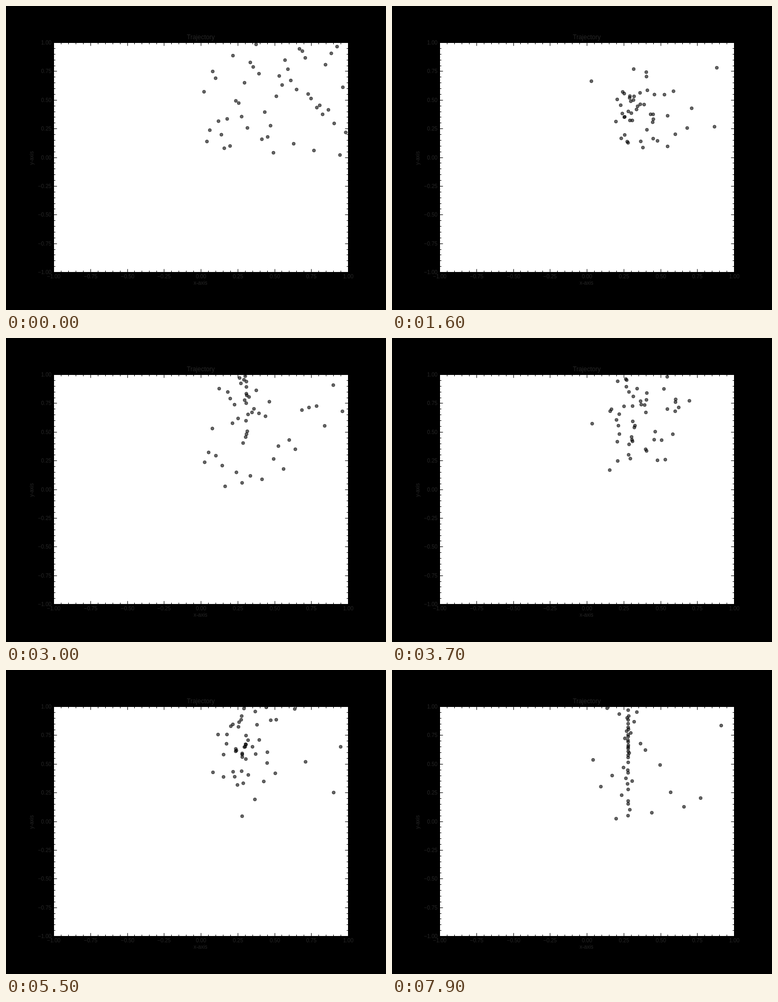
An HTML page with a canvas that plays this animation: 720x576 px, repeating every 8000 ms.

```html
<!DOCTYPE html>
<html lang="en">
<head>
<meta charset="utf-8">
<title>Trajectory</title>
<style>
html, body { margin: 0; width: 100%; height: 100%; overflow: hidden; background: #000; }
canvas { display: block; }
</style>
</head>
<body>
<canvas id="stage" width="720" height="576"></canvas>
<script>
const ctx = document.getElementById('stage').getContext('2d');
const LOOP = 8000, STEP = 100, COUNT = 50;
const L = 90, R = 648, T = 69.12, B = 504;
const FONT = '"Liberation Sans", Arial, sans-serif';

// The walls that hold the swarm
const WALL = { left: 372, right: 646, top: 70, bottom: 284 };

// Swarm centre at a step; px and py set how tightly dots crowd around it (1 = evenly spread)
const swarms = [
  { at: 0, x: 509, y: 177, px: 1, py: 1 },
  { at: 9, x: 436, y: 178, px: 2.3, py: 1.8 },
  { at: 23, x: 472, y: 213, px: 3.2, py: 2.8 },
  { at: 30, x: 455, y: 143, px: 2.4, py: 1.2 },
  { at: 45, x: 448, y: 137, px: 4, py: 3.2 },
  { at: 65, x: 446, y: 155, px: 4.5, py: 1.1 },
  { at: 79, x: 447, y: 155, px: 6, py: 1.1 }
];

const frac = v => v - Math.floor(v);
const noise = (a, b) => frac(Math.sin(a * 127.1 + b * 311.7) * 43758.5453);

// Shuffled, evenly spaced values from -1 to 1
function shuffled(seed) {
  return Array.from({ length: COUNT }, (_, i) => i)
    .sort((a, b) => noise(a + 1, seed) - noise(b + 1, seed))
    .map(i => (2 * i + 1) / COUNT - 1);
}

// Signed u becomes a place between the centre and one wall
const spread = (u, mid, lo, hi, power) =>
  mid + (u < 0 ? lo - mid : hi - mid) * Math.abs(u) ** power;

const poses = swarms.map((s, n) => {
  const us = shuffled(n + 3), vs = shuffled(n + 33);
  return us.map((u, i) => [
    spread(u, s.x, WALL.left, WALL.right, s.px),
    spread(vs[i], s.y, WALL.top, WALL.bottom, s.py)
  ]);
});

// Bounce off the walls
function fold(v, lo, hi) {
  if (v < lo) v = 2 * lo - v;
  if (v > hi) v = 2 * hi - v;
  return Math.min(hi, Math.max(lo, v));
}

function place(i, step) {
  let k = 0;
  while (k < swarms.length - 2 && step >= swarms[k + 1].at) k++;
  const a = swarms[k], b = swarms[k + 1], gap = b.at - a.at;
  const u = (step - a.at) / gap;
  const ease = k ? u * u * (3 - 2 * u) : 1 - (1 - u) ** 2;
  const swing = axis => {
    const waves = 1 + Math.floor(noise(i + axis * 60, k) * gap / 4);
    return Math.sin(Math.PI * u * waves) * (noise(i, k + 20 + axis) < 0.5 ? -1 : 1);
  };
  const wx = (15 / b.px + 190 * noise(i, k + 40) ** 7) * swing(0);
  const wy = (8 + 70 * noise(i, k + 50) ** 2) * swing(1);
  const [x0, y0] = poses[k][i], [x1, y1] = poses[k + 1][i];
  return [
    fold(x0 + (x1 - x0) * ease + wx, WALL.left, WALL.right),
    fold(y0 + (y1 - y0) * ease + wy, WALL.top, WALL.bottom)
  ];
}

function line(x0, y0, x1, y1) {
  ctx.beginPath();
  ctx.moveTo(x0, y0);
  ctx.lineTo(x1, y1);
  ctx.stroke();
}

function text(str, x, y, size, align) {
  ctx.font = size + 'px ' + FONT;
  ctx.textAlign = align;
  ctx.fillText(str, x, y);
}

const snap = v => Math.round(v) + 0.5;

function drawAxes() {
  const l = snap(L), r = snap(R), t = snap(T), b = snap(B);
  ctx.strokeStyle = '#000';
  ctx.fillStyle = '#262626';
  ctx.lineWidth = 1;
  ctx.strokeRect(l, t, r - l, b - t);
  for (let i = 0; i <= 40; i++) {
    const major = i % 5 === 0, len = major ? 6 : 3;
    const x = snap(L + (R - L) * i / 40);
    const y = snap(B - (B - T) * i / 40);
    line(x, t, x, t + len);
    line(x, b, x, b - len);
    line(l, y, l + len, y);
    line(r, y, r - len, y);
    if (major) {
      const v = i / 20 - 1;
      const label = (v < 0 ? '\u2212' : '') + Math.abs(v).toFixed(2);
      text(label, x, 516, 10, 'center');
      text(label, 86, y + 3.5, 10, 'right');
    }
  }
  text('Trajectory', 369, 63, 12, 'center');
  text('x-axis', 368.5, 528, 10, 'center');
  ctx.save();
  ctx.translate(51.5, 288);
  ctx.rotate(-Math.PI / 2);
  text('y-axis', 0, 0, 10, 'center');
  ctx.restore();
}

function drawDots(step) {
  ctx.save();
  ctx.beginPath();
  ctx.rect(L, T, R - L, B - T);
  ctx.clip();
  ctx.fillStyle = ctx.strokeStyle = 'rgba(0,0,0,0.6)';
  ctx.lineWidth = 1;
  for (let i = 0; i < COUNT; i++) {
    const [x, y] = place(i, step);
    ctx.beginPath();
    ctx.arc(x + 0.5, y + 0.5, 3, 0, 2 * Math.PI);
    ctx.fill();
    ctx.stroke();
  }
  ctx.restore();
}

const begin = performance.now();
function draw() {
  const step = Math.floor(((performance.now() - begin) % LOOP) / STEP);
  ctx.fillStyle = '#000';
  ctx.fillRect(0, 0, 720, 576);
  ctx.fillStyle = '#fff';
  ctx.fillRect(L, T, R - L, B - T);
  drawDots(step);
  drawAxes();
  requestAnimationFrame(draw);
}
draw();
</script>
</body>
</html>
```
